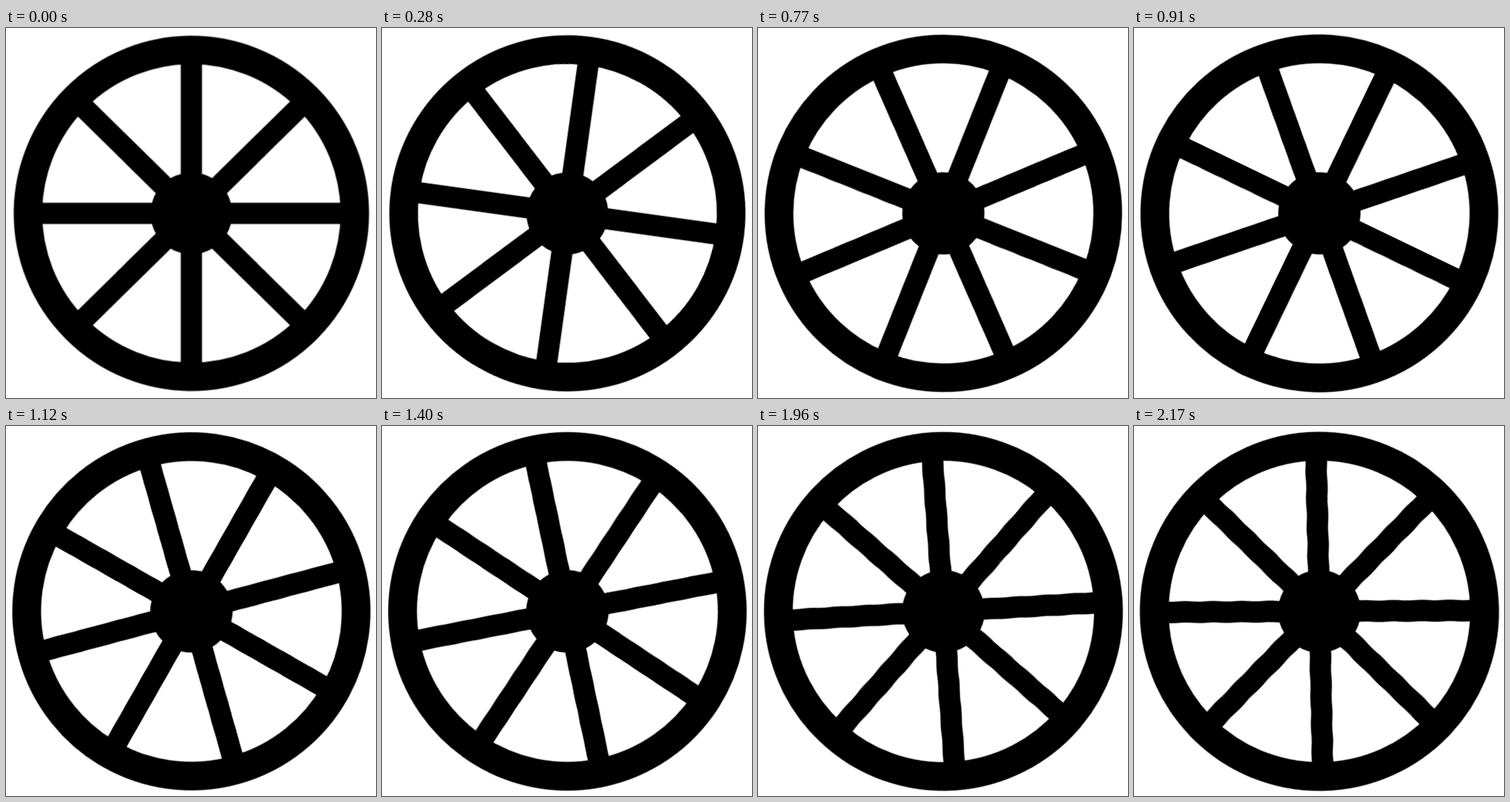
Write an HTML page that moves like this. It is 480 px wide and 480 px high and loops after 2240 ms.

```html
<!DOCTYPE html>
<html lang="en">
<head>
<meta charset="utf-8">
<title>Turning wheel</title>
<style>
  html, body { margin: 0; width: 100%; height: 100%; overflow: hidden; background: #fff; }
  svg { display: block; width: 100%; height: 100%; }
  #wheel { transform-origin: 0 0; animation: turn 2240ms infinite; }
  /* 14 quick steps, then 18 slower ones, 70 ms each */
  @keyframes turn {
    0%     { transform: rotate(0deg) scale(1); animation-timing-function: steps(14); }
    43.75% { transform: rotate(27.7deg) scale(1.0075); animation-timing-function: steps(18); }
    100%   { transform: rotate(45.2deg) scale(1.011); }
  }
</style>
</head>
<body>
<svg viewBox="0 0 480 480">
  <g transform="translate(240.5 240.5)">
    <g id="wheel">
      <circle r="212" fill="none" stroke="#000" stroke-width="37"/>
      <path id="spokes" fill="none" stroke="#000" stroke-width="27.5"/>
      <circle r="53"/>
    </g>
  </g>
</svg>
<script>
  const STEP = 70, STEPS = 32, REACH = 205;
  const LEAN = 0.45; // degrees by which the diagonals lie flatter than 45
  const spokes = document.getElementById('spokes');
  const start = performance.now();
  let shown = -1;

  // A radial line that sways sideways by a small wave.
  function spoke(index, sway) {
    const angle = (index * 45 - LEAN * Math.sin(index * Math.PI / 2)) * Math.PI / 180;
    const cos = Math.cos(angle), sin = Math.sin(angle);
    const points = [];
    for (let r = 0; r <= REACH; r += 5) {
      const side = sway * Math.sin(r * Math.PI / 18 + index);
      points.push((r * cos - side * sin).toFixed(2) + ' ' + (r * sin + side * cos).toFixed(2));
    }
    return 'M' + points.join('L');
  }

  function draw(step) {
    const sway = 0.4 * (step / (STEPS - 1)) ** 2;
    let d = '';
    for (let i = 0; i < 8; i++) d += spoke(i, sway);
    spokes.setAttribute('d', d);
    shown = step;
  }

  function tick() {
    const step = Math.floor((performance.now() - start) / STEP) % STEPS;
    if (step !== shown) draw(step);
    requestAnimationFrame(tick);
  }

  tick();
</script>
</body>
</html>
```
